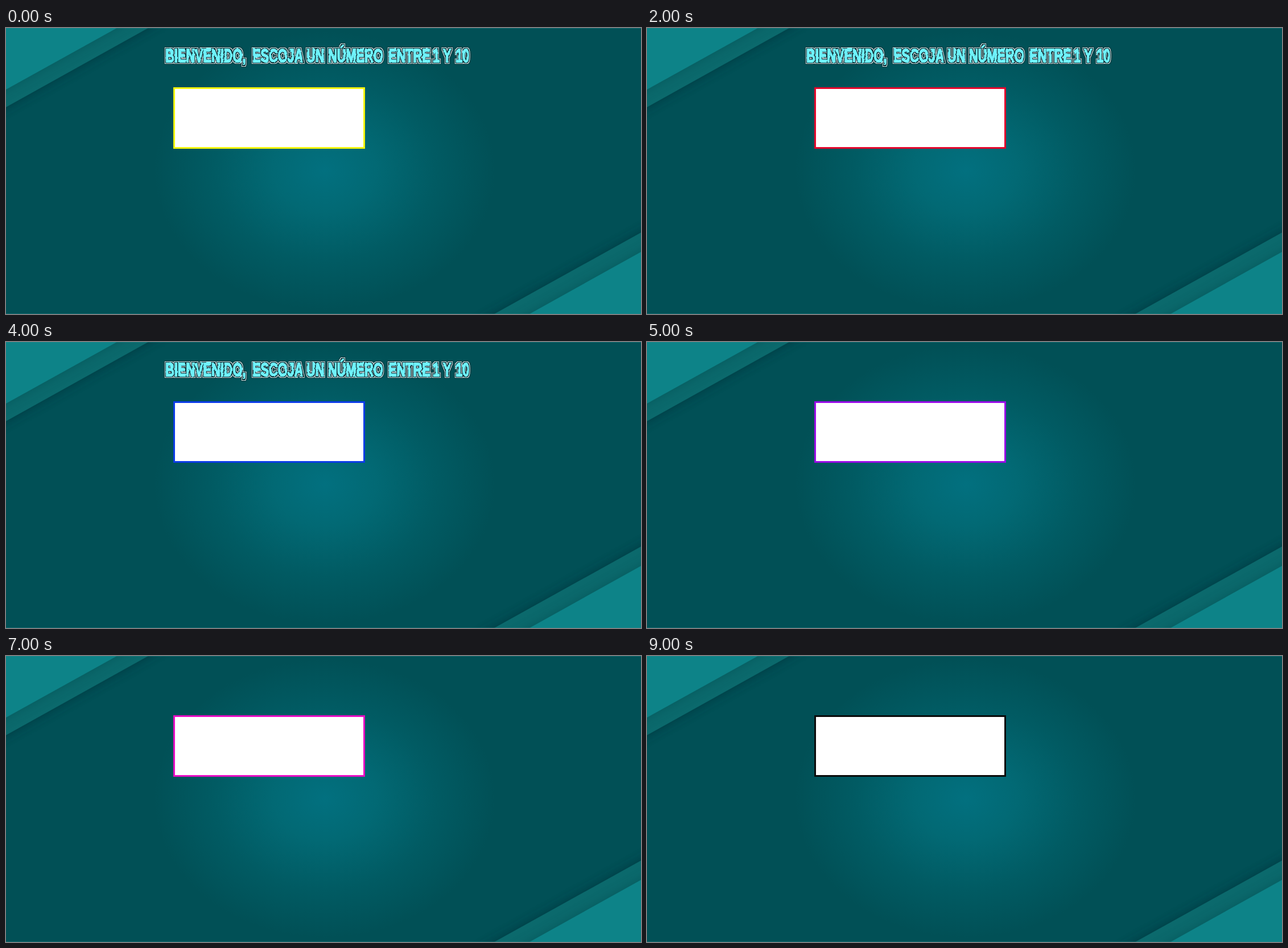
These frames come from a looping animation (1116x502 px, 10000 ms). An HTML page:

```html
<!DOCTYPE html>
<html lang="es">
<head>
<meta charset="utf-8">
<title>Escoja un número</title>
<style>
  html, body { margin: 0; width: 100%; height: 100%; overflow: hidden; background: #015056; }
  svg { display: block; width: 1116px; height: 502px; }
  text { font: bold 33px "Liberation Sans", Arial, sans-serif; fill: #6ff2fb; stroke: #6ff2fb; stroke-width: 2; }
</style>
</head>
<body>
<svg viewBox="0 0 1116 502">
  <defs>
    <radialGradient id="glow" gradientUnits="userSpaceOnUse" cx="0" cy="0" r="1"
      gradientTransform="translate(560 250) scale(300 245)">
      <stop offset="0" stop-color="#02707f"/>
      <stop offset=".3" stop-color="#026974"/>
      <stop offset=".65" stop-color="#015b63"/>
      <stop offset="1" stop-color="#015056"/>
    </radialGradient>
    <filter id="soft" x="-20%" y="-30%" width="140%" height="160%">
      <feGaussianBlur stdDeviation="9"/>
    </filter>
    <filter id="chip" filterUnits="userSpaceOnUse" x="265" y="15" width="570" height="65" color-interpolation-filters="sRGB">
      <feTurbulence type="fractalNoise" baseFrequency=".16" numOctaves="2" seed="4" result="noise"/>
      <feDisplacementMap in="SourceGraphic" in2="noise" scale="3" xChannelSelector="R" yChannelSelector="G" result="face"/>
      <feMorphology in="SourceAlpha" operator="dilate" radius="1" result="inner"/>
      <feMorphology in="SourceAlpha" operator="dilate" radius="2" result="outer"/>
      <feGaussianBlur in="outer" stdDeviation="1.3" result="shade"/>
      <feFlood flood-color="#cfe2e4"/>
      <feComposite in2="outer" operator="in" result="rim"/>
      <feFlood flood-color="#08272d"/>
      <feComposite in2="inner" operator="in" result="edge"/>
      <feMerge>
        <feMergeNode in="shade"/>
        <feMergeNode in="rim"/>
        <feMergeNode in="edge"/>
        <feMergeNode in="face"/>
      </feMerge>
    </filter>
    <clipPath id="bandTop"><path d="M0 0H250L0 139Z"/></clipPath>
    <clipPath id="bandEnd"><path d="M1116 359V502H858Z"/></clipPath>
  </defs>

  <rect width="1116" height="502" fill="#015056"/>
  <rect width="1116" height="502" fill="url(#glow)"/>

  <path d="M-40 -20H286L-40 161Z" fill="#00333a" opacity=".75" filter="url(#soft)"/>
  <path d="M0 0H250L0 139Z" fill="#0b696c"/>
  <g clip-path="url(#bandTop)">
    <path d="M-40 -20H231L-40 130Z" fill="#08484e" opacity=".5" filter="url(#soft)"/>
  </g>
  <path d="M0 0H195L0 108Z" fill="#0d8388"/>

  <path d="M1156 337V522H822Z" fill="#00333a" opacity=".75" filter="url(#soft)"/>
  <path d="M1116 359V502H858Z" fill="#0b696c"/>
  <g clip-path="url(#bandEnd)">
    <path d="M1156 371V522H884Z" fill="#08484e" opacity=".5" filter="url(#soft)"/>
  </g>
  <path d="M1116 393V502H920Z" fill="#0d8388"/>
  <path d="M0 .5H1116M0 501.5H1116" stroke="#2b8a90" stroke-opacity=".4"/>

  <g id="title" filter="url(#chip)"></g>
  <rect id="box" x="295.5" y="105.5" width="334" height="105" fill="#fff" stroke-width="3"/>
</svg>
<script>
  const title = document.getElementById("title");
  const box = document.getElementById("box");
  const colors = ["#f4f40c", "#f07a0c", "#e4072c", "#0be234", "#0c3ce8",
                  "#9a0be8", "#0bdcec", "#e80cc4", "#7a12ea", "#0a0a0a"];
  const words = [["BIENVENIDO,", 280], ["ESCOJA", 433], ["UN", 528], ["NÚMERO", 566],
                 ["ENTRE", 672], ["1", 750], ["Y", 768], ["10", 790]];

  // one narrow face for the whole heading
  for (const [word, x] of words) {
    const t = document.createElementNS("http://www.w3.org/2000/svg", "text");
    t.setAttribute("transform", `translate(${x} 59.5) scale(.66 1)`);
    t.textContent = word;
    title.append(t);
  }

  function draw(ms) {
    const step = Math.floor(ms / 1000) % colors.length;
    box.setAttribute("stroke", colors[step]);
    title.setAttribute("visibility", step % 2 ? "hidden" : "visible");
  }

  let start;
  function tick(now) {
    start ??= now;
    draw(now - start);
    requestAnimationFrame(tick);
  }
  draw(0);
  requestAnimationFrame(tick);
</script>
</body>
</html>
```
